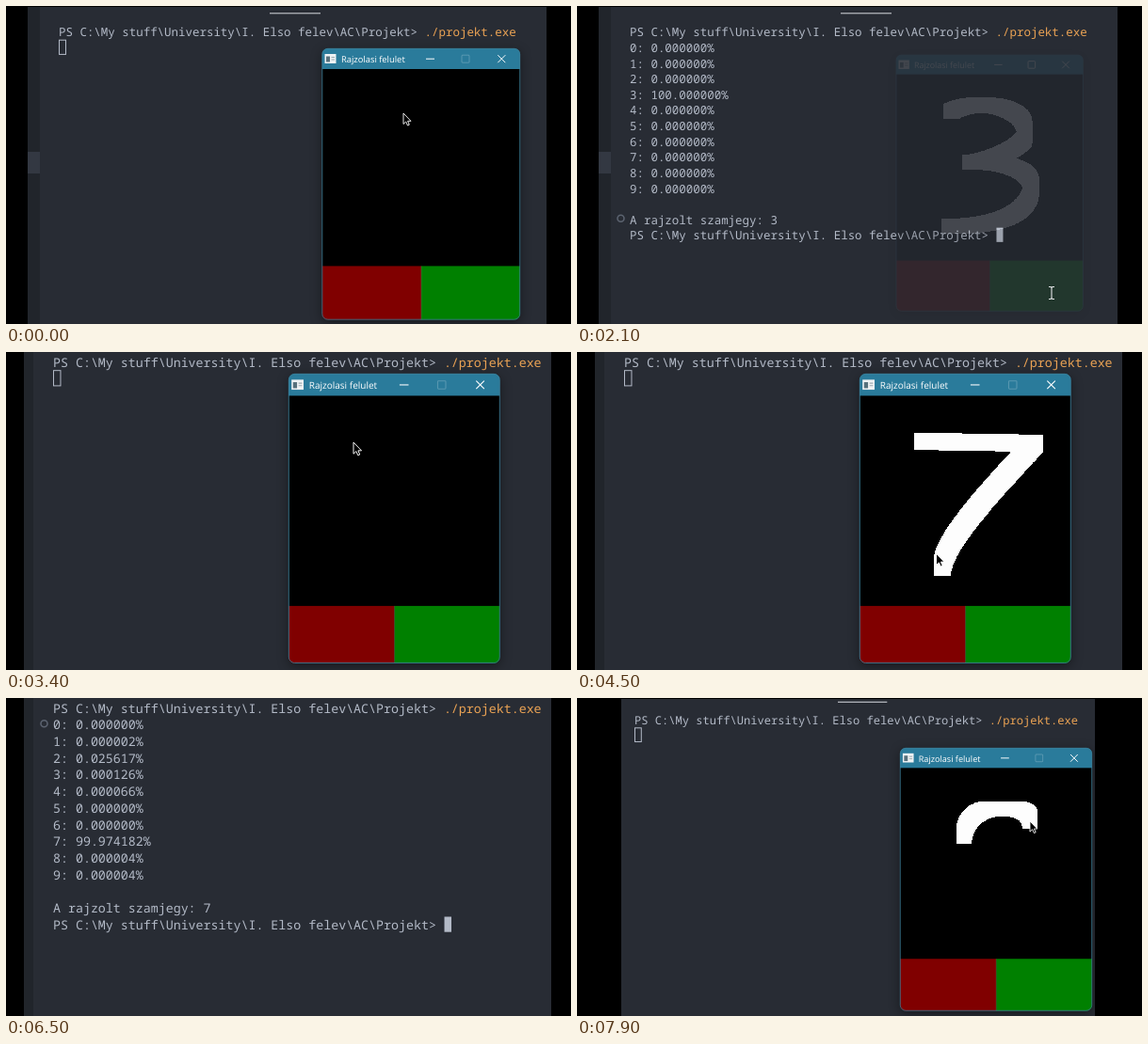
Animation of 600 by 338 pixels, one loop 8000 ms. Source, as an HTML page:

```html
<!DOCTYPE html>
<html lang="hu">
<head>
<meta charset="utf-8">
<title>Rajzolasi felulet</title>
<style>
html, body { margin: 0; width: 100%; height: 100%; overflow: hidden; background: #000; }
svg { display: block; width: 100vw; height: 100vh; }
text { white-space: pre; text-rendering: geometricPrecision; }
.mono { font-family: "Noto Sans Mono", "DejaVu Sans Mono", monospace; fill: #b3bac7; }
.title { font: 9.4px "Open Sans", "Noto Sans", sans-serif; fill: #fff; }
#win { filter: drop-shadow(0 3px 6px rgba(0, 0, 0, .4)); }
</style>
</head>
<body>
<svg viewBox="0 0 600 338">
  <rect width="600" height="338" fill="#000"/>
  <g id="term"></g>
  <g id="win">
    <g id="frame">
      <clipPath id="round"><rect width="210.5" height="288.5" rx="6"/></clipPath>
      <g clip-path="url(#round)">
        <rect width="210.5" height="288.5" fill="#000"/>
        <rect width="210.5" height="22" fill="#2a7b9b"/>
        <rect y="231.4" width="105.5" height="58" fill="#800000"/>
        <rect x="105.5" y="231.4" width="105" height="58" fill="#008000"/>
        <path d="M105.5 231.4V289" stroke="#5a6a50" stroke-width=".5"/>
      </g>
      <rect x=".3" y=".3" width="209.9" height="287.9" rx="6" fill="none" stroke="#3d7f99" stroke-width=".8"/>
      <rect x="3" y="6" width="12" height="10" fill="#eef2f4"/>
      <path d="M4.5 8.5h4v6h-4z" fill="#56707c"/>
      <path d="M10 9.5h3.5M10 12h3.5" stroke="#9aa9b0"/>
      <text class="title" x="20.4" y="15">Rajzolasi felulet</text>
      <g fill="none" stroke="#fff">
        <path d="M110.5 11.2h9"/>
        <rect id="max" x="148.5" y="7.2" width="8" height="8" rx=".8"/>
        <path d="M186.8 7.2l8 8m0-8l-8 8"/>
      </g>
    </g>
    <path id="ink" fill="#fdfdfd" shape-rendering="crispEdges"/>
  </g>
  <g id="pointer">
    <path id="arrow" d="M0 0V11.5L2.7 9L4.5 13L6.3 12.2L4.6 8.3H8Z" fill="#000" stroke="#fff" stroke-width=".9"/>
    <path id="beam" d="M-3-6.5h2l1 1l1-1h2M0-5.5v11M-3 6.5h2l1-1l1 1h2" fill="none" stroke="#e4e6e8" stroke-width="1.1"/>
  </g>
</svg>
<script>
const LOOP = 8000, STEP = 100, FADE = 115;
const CHAR = 7.48, LINE = 16.62, BRUSH = 17;
const PROMPT = "PS C:\\My stuff\\University\\I. Elso felev\\AC\\Projekt> ";
const SVG = "http://www.w3.org/2000/svg";
const $ = id => document.getElementById(id);
const clamp = v => Math.max(0, Math.min(1, v));
const mix = (a, b, u) => a + (b - a) * u;

// A pen path drawn from one time to another; the pointer glides between them.
function stroke(from, to, d) {
  const path = document.createElementNS(SVG, "path");
  path.setAttribute("d", d);
  const length = path.getTotalLength(), count = Math.ceil(length * 1.5);
  const points = Array.from({ length: count + 1 }, (_, i) => path.getPointAtLength(length * i / count));
  return { from, to, points, draws: true };
}

const rest = (time, x, y) => ({ from: time, to: time, points: [{ x, y }], draws: false });

const scenes = [
  {
    start: 0, done: 2000, k: 1, x: 56, y: 32.3, top: 1, left: 23, right: 574, gutter: 13,
    thumb: 155, tab: 280, markRow: 12, winX: 335.5, winY: 45,
    digit: 3, odds: { 3: "100.000000" },
    pen: [
      rest(0, 422, 114),
      stroke(250, 1000, "M397 109C420 97 450 101 464 108S482 122 480 138C478 148 440 166 418 166C446 164 486 170 488 192"),
      stroke(1000, 1400, "M488 192C487 232 430 238 395 238"),
      rest(1800, 498, 300),
      rest(2100, 504, 305),
      rest(2700, 500, 346)
    ]
  },
  {
    start: 2900, done: 5600, k: 1.067, x: 50, y: 15.5, top: 0, left: 19, right: 579, gutter: 10,
    markRow: 1, winX: 300, winY: 23, digit: 7,
    odds: { 1: "0.000002", 2: "0.025617", 3: "0.000126", 4: "0.000066", 7: "99.974182", 8: "0.000004", 9: "0.000004" },
    pen: [
      rest(2900, 392, 118),
      rest(3400, 369, 96),
      stroke(3420, 3950, "M367 95L486 97"),
      stroke(3950, 4450, "M486 97C462 125 388 198 388 229"),
      stroke(4650, 5000, "M362 170H474"),
      rest(5400, 480, 300),
      rest(5600, 492, 330),
      rest(5900, 495, 348)
    ]
  },
  {
    start: 7000, done: Infinity, k: .969, x: 61, y: 28, top: 1, left: 47, right: 550, gutter: 0,
    tab: 277, winX: 343, winY: 53,
    pen: [
      rest(7000, 432, 122),
      stroke(7400, 7900, "M411 147C411 130 426 118 440 118H466C474 119 481 122 481 131")
    ]
  }
];

function pointerAt(pen, t) {
  const i = pen.findLastIndex(s => s.from <= t), s = pen[i], next = pen[i + 1];
  const last = s.points.length - 1;
  if (t < s.to) return s.points[Math.round((t - s.from) / (s.to - s.from) * last)];
  const end = s.points[last];
  if (!next) return end;
  const u = clamp((t - s.to) / (next.from - s.to || 1)), goal = next.points[0];
  return { x: mix(end.x, goal.x, u), y: mix(end.y, goal.y, u) };
}

// The brush is a square stamped along the pen path.
function inkPath(sc, t) {
  const size = BRUSH * sc.k;
  const stamp = p => `M${p.x - size / 2} ${p.y - size / 2}h${size}v${size}h${-size}z`;
  return sc.pen.filter(s => s.draws && t > s.from).map(s => {
    const u = clamp((t - s.from) / (s.to - s.from));
    return s.points.slice(0, Math.round(u * (s.points.length - 1)) + 1).map(stamp).join("");
  }).join("");
}

const rect = (x, y, w, h, attrs) => `<rect x="${x}" y="${y}" width="${w}" height="${h}" ${attrs}/>`;

function terminal(sc, done) {
  const { k, x, y, top, left, right } = sc, size = CHAR * k / .6;
  const row = i => y + i * LINE * k;
  const text = (i, s) => `<text class="mono" x="${x}" y="${row(i)}" font-size="${size}">${s}</text>`;
  const cursor = (col, i, attrs) =>
    rect(x + col * CHAR * k + .5, row(i) - 12.7 * k, 7 * k, 15.2 * k, attrs);
  const prompt = PROMPT.replace(">", "&gt;");

  let out = rect(left, top, right - left, 338, 'fill="#282c34"');
  out += rect(left, top, sc.gutter, 338, 'fill="#21252b"');
  if (sc.thumb) out += rect(left, sc.thumb, sc.gutter, 23, 'fill="#333842"');
  if (sc.tab) out += rect(sc.tab, y - 25 * k, 54 * k, 1, 'fill="#d7dae0"');
  out += text(0, prompt + '<tspan fill="#eba354">./projekt.exe</tspan>');
  if (!done) return out + cursor(0, 1, 'fill="none" stroke="#b3bac7"');

  for (let i = 0; i < 10; i++) out += text(i + 1, `${i}: ${sc.odds[i] || "0.000000"}%`);
  out += text(12, `A rajzolt szamjegy: ${sc.digit}`) + text(13, prompt);
  out += cursor(PROMPT.length, 13, 'fill="#b3bac7"');
  return out + `<circle cx="${x - 9.5}" cy="${row(sc.markRow) - 6}" r="3.5" fill="none" stroke="#5c6370" stroke-width="1.6"/>`;
}

let shown = "";

function draw(t) {
  const sc = scenes.findLast(s => s.start <= t);
  const { k, winX, winY } = sc;
  const done = t >= sc.done;
  const key = sc.start + "/" + done;
  if (key !== shown) {
    $("term").innerHTML = terminal(sc, done);
    shown = key;
  }

  const fade = clamp((t - sc.done) / FADE), zoom = 1 - .063 * fade;
  const pivotX = winX + 58 * k, pivotY = winY + 125 * k;
  $("win").setAttribute("transform",
    `translate(${pivotX} ${pivotY}) scale(${zoom}) translate(${-pivotX} ${-pivotY})`);
  $("win").setAttribute("opacity", 1 - fade);
  $("frame").setAttribute("transform", `translate(${winX} ${winY}) scale(${k})`);
  $("max").setAttribute("opacity", done ? 1 : .22);
  $("ink").setAttribute("d", inkPath(sc, t));

  const tip = pointerAt(sc.pen, t);
  $("pointer").setAttribute("transform", `translate(${tip.x} ${tip.y}) scale(${k})`);
  $("arrow").setAttribute("opacity", done ? 0 : 1);
  $("beam").setAttribute("opacity", done ? 1 : 0);
}

const origin = performance.now();
function tick() {
  const t = (performance.now() - origin) % LOOP;
  draw(Math.floor(t / STEP) * STEP);
  requestAnimationFrame(tick);
}
tick();
</script>
</body>
</html>
```
